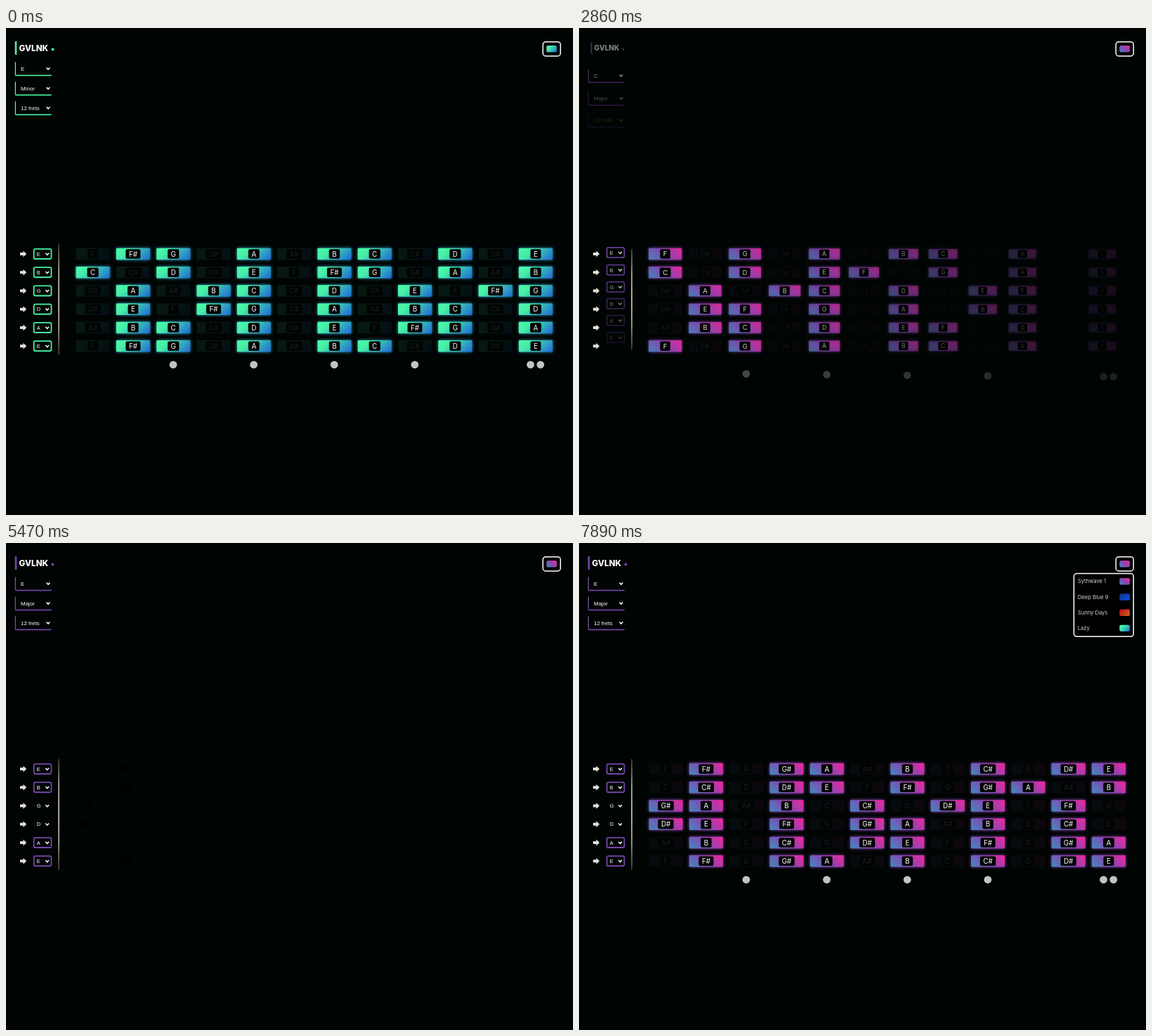
These frames come from a looping animation (807x694 px, 8000 ms). An HTML page with a canvas:

```html
<!DOCTYPE html>
<html lang="en">
<head>
<meta charset="utf-8">
<title>Fretboard</title>
<style>
html, body { margin: 0; width: 100%; height: 100%; overflow: hidden; background: #000403; }
canvas { display: block; width: 807px; height: 694px; }
</style>
</head>
<body>
<canvas id="stage" width="807" height="694"></canvas>
<script>
const ctx = document.getElementById('stage').getContext('2d');
const BG = '#000403';
const LOOP = 8000;
const NOTES = ['C', 'C#', 'D', 'D#', 'E', 'F', 'F#', 'G', 'G#', 'A', 'A#', 'B'];
const STRINGS = ['E', 'B', 'G', 'D', 'A', 'E'];
const MAJOR = [0, 2, 4, 5, 7, 9, 11];
const MINOR = [0, 2, 3, 5, 7, 8, 10];
const SANS = '"Liberation Sans", Arial, sans-serif';
const INTER = 'Inter, sans-serif';

// Gradients run down-right, or up-right when "up" is set.
const LAZY = { stops: ['#4bffa5', '#46eda8', '#1f68d6'], line: '#48f3a4', glow: '#2f9fc0', dim: 0.085 };
const SYNTH = { stops: ['#3d8cbe', '#8a45b2', '#f2279b'], up: true, line: '#7646a8', glow: '#8c43b4', dim: 0.06 };
const MENU = [
  ['Sythwave 1', SYNTH],
  ['Deep Blue 9', { stops: ['#0b2f78', '#0e3aa4', '#1450ea'] }],
  ['Sunny Days', { stops: ['#c00a28', '#c4261c', '#cf6a14'] }],
  ['Lazy', LAZY]
];

// Timeline, ms
const RELOAD = 2365, LOAD_START = 2270;
const OPEN = 4220, PICK = 5410, PICK_START = 5430;
const PALETTE = 7890;

const clamp = v => Math.max(0, Math.min(1, v));
const ease = p => p < 0.5 ? 2 * p * p : 1 - 2 * (1 - p) * (1 - p);
const reveal = (t, delay, len) => ease(clamp((t - delay) / len));
const rowY = i => 322 + 26.25 * i;
const colX = n => 123.6 + 57.3 * (n - 1);

function group(x, y, scale, alpha, draw) {
  ctx.save();
  ctx.translate(x, y);
  ctx.scale(scale, scale);
  ctx.globalAlpha = alpha;
  draw();
  ctx.restore();
}

function box(x, y, w, h, r) {
  ctx.beginPath();
  ctx.roundRect(x, y, w, h, r);
}

function text(s, x, y, font, color, align = 'left') {
  ctx.font = font;
  ctx.fillStyle = color;
  ctx.textAlign = align;
  ctx.textBaseline = 'alphabetic';
  ctx.fillText(s, x, y);
}

function paint(theme, w, h) {
  const d = (w + h) / 4, k = theme.up ? -d : d;
  const g = ctx.createLinearGradient(-d, -k, d, k);
  theme.stops.forEach((c, i) => g.addColorStop([0, theme.up ? 0.5 : 0.3, 1][i], c));
  return g;
}

function chevron(x, y) {
  ctx.beginPath();
  ctx.moveTo(x - 2.4, y - 1.2);
  ctx.lineTo(x, y + 1.3);
  ctx.lineTo(x + 2.4, y - 1.2);
  ctx.strokeStyle = '#fff';
  ctx.lineWidth = 1.5;
  ctx.stroke();
}

function logo(theme, e) {
  const s = 0.72 + 0.28 * e;
  group(40.5, 28.5, s, e, () => {
    ctx.fillStyle = theme.line;
    ctx.fillRect(-27.8, -9.5, 2.6, 19);
    text('GVLNK', -22, 4.2, '800 11.7px ' + INTER, '#fff');
    ctx.beginPath();
    ctx.arc(26, 2, 2, 0, 7);
    ctx.fillStyle = theme.line;
    ctx.fill();
  });
}

function headerSelect(label, y, theme, alpha) {
  group(0, y, 1, alpha, () => {
    const side = ctx.createLinearGradient(0, -10, 0, 10);
    side.addColorStop(0, theme === LAZY ? '#b9c8c2' : '#75688c');
    side.addColorStop(1, theme.line);
    box(12.5, -10, 53, 20.8, 3);
    ctx.save();
    ctx.clip();
    ctx.fillStyle = side;
    ctx.fillRect(12.5, -10, 1.5, 21);
    ctx.fillStyle = theme.line;
    ctx.fillRect(12.5, 8.9, 53, 2);
    ctx.restore();
    text(label, 21, 2.8, '8px ' + SANS, '#fff');
    chevron(60, 0);
  });
}

function stringSelect(label, y, theme, alpha, framed) {
  group(0, y, 1, alpha, () => {
    if (framed) {
      box(39.7, -7.2, 24.8, 14.2, 2);
      ctx.strokeStyle = theme.line;
      ctx.lineWidth = 1.8;
      ctx.stroke();
    }
    text(label, 43.7, 2.7, '7.5px ' + SANS, '#fff');
    chevron(58.7, 0);
  });
}

function arrow(y) {
  ctx.beginPath();
  [[20, -2], [24.5, -2], [24.5, -4.4], [29.2, 0], [24.5, 4.4], [24.5, 2], [20, 2]]
    .forEach(([x, dy]) => ctx.lineTo(x, y + dy));
  ctx.fillStyle = '#e4e0da';
  ctx.fill();
}

function nut(scale) {
  const h = 79 * scale;
  const g = ctx.createLinearGradient(0, 387 - h, 0, 387 + h);
  g.addColorStop(0, '#4a4642');
  g.addColorStop(0.25, '#d8d0c6');
  g.addColorStop(0.5, '#f4eee6');
  g.addColorStop(0.75, '#d0c8be');
  g.addColorStop(1, '#4a4642');
  ctx.fillStyle = g;
  ctx.fillRect(74.4, 387 - h, 1.4, 2 * h);
}

function note(name, n, y, theme, lit, e) {
  if (e <= 0) return;
  const off = 1 - e;
  group(colX(n) - 10 * off, y, 1 - 0.22 * off, e * (lit ? 1 : theme.dim), () => {
    ctx.fillStyle = paint(theme, 48, 16.6);
    if (lit) {
      ctx.shadowColor = theme.glow;
      ctx.shadowBlur = 4;
    }
    box(-24, -8.3, 48, 16.6, 1);
    ctx.fill();
    ctx.shadowBlur = 0;

    ctx.font = '9.8px ' + INTER;
    const w = ctx.measureText(name).width + 9;
    ctx.globalAlpha = 1;
    ctx.fillStyle = lit ? '#000201' : BG;
    box(-w / 2, -6.8, w, 13.6, 2);
    ctx.fill();
    ctx.globalAlpha = lit ? e : e * 0.1;
    text(name, 0, 3.5, '9.8px ' + INTER, '#fff', 'center');
  });
}

function board(theme, root, steps, t) {
  const scale = steps.map(s => (NOTES.indexOf(root) + s) % 12);
  STRINGS.forEach((open, i) => {
    for (let n = 1; n <= 12; n++) {
      const k = (NOTES.indexOf(open) + n) % 12;
      note(NOTES[k], n, rowY(i), theme, scale.includes(k), reveal(t, 40 * (n - 1), 750));
    }
  });
  for (const n of [3, 5, 7, 9, 12]) {
    const e = reveal(t, 20 * n, 1280);
    for (const dx of n === 12 ? [-7.2, 7] : [0]) {
      ctx.globalAlpha = e;
      ctx.beginPath();
      ctx.arc(colX(n) + dx - 0.2, 479.8 + 20 * (1 - e), 5.4, 0, 7);
      ctx.fillStyle = '#bfc7c3';
      ctx.fill();
    }
  }
  ctx.globalAlpha = 1;
}

function frame(x, y, w, h) {
  box(x, y, w, h, 4);
  ctx.fillStyle = '#000';
  ctx.fill();
  ctx.strokeStyle = '#fff';
  ctx.lineWidth = 1.5;
  ctx.stroke();
}

function swatch(y, theme) {
  group(776.6, y, 1, 1, () => {
    ctx.fillStyle = paint(theme, 14.6, 9.4);
    box(-7.3, -4.7, 14.6, 9.4, 2);
    ctx.fill();
  });
}

function themeMenu() {
  frame(704.4, 43.5, 84.8, 89.8);
  MENU.forEach(([name, theme], i) => {
    const y = 54.8 + 22.2 * i;
    text(name, 709.8, y + 2.6, '7.6px ' + INTER, '#cdd2d0');
    swatch(y, theme);
  });
}

function keyList(t) {
  const picked = [4550, 4650, 4790, 4960].filter(at => t >= at).length;
  ctx.fillStyle = '#fff';
  ctx.fillRect(12.5, 68, 52.5, 121);
  NOTES.forEach((name, i) => {
    const y = 73.6 + 9.93 * i;
    if (i === picked) {
      ctx.fillStyle = '#7a54c8';
      ctx.fillRect(12.5, y - 5.2, 52.5, 10.4);
    }
    text(name, 20.5, y + 2.6, '7.4px ' + SANS, i === picked ? '#fff' : '#222');
  });
  ctx.strokeStyle = '#77747c';
  ctx.lineWidth = 0.6;
  ctx.strokeRect(12.5, 68, 52.5, 121);
}

function draw(t) {
  ctx.globalAlpha = 1;
  ctx.fillStyle = BG;
  ctx.fillRect(0, 0, 807, 694);

  const loaded = t >= RELOAD, chosen = t >= PICK;
  const theme = loaded ? SYNTH : LAZY;
  const root = loaded && !chosen ? 'C' : 'E';
  const page = loaded ? t - LOAD_START : 1e5;
  const notes = chosen ? t - PICK_START : page;

  logo(theme, reveal(page, 215, 750));
  [root, loaded ? 'Major' : 'Minor', '12 frets'].forEach((label, i) => {
    const e = reveal(page, 215 + 95 * i, 750);
    headerSelect(label, 57.8 + 28 * i + 20 * (1 - e), theme, e);
  });

  STRINGS.forEach((label, i) => {
    const e = reveal(page, 30 + 65 * i, 750);
    const framed = !(chosen && (i === 2 || i === 3));
    stringSelect(label, rowY(i) - 15 * (1 - e), theme, e, framed);
    arrow(rowY(i));
  });
  nut(reveal(page, 0, 750));
  board(theme, root, loaded ? MAJOR : MINOR, notes);

  frame(764.2, 19.7, 25, 20.2);
  swatch(29.8, theme);
  if (t >= OPEN && !chosen) keyList(t);
  if (t >= PALETTE) themeMenu();
}

const start = performance.now();
function tick() {
  draw((performance.now() - start) % LOOP);
  requestAnimationFrame(tick);
}
tick();
</script>
</body>
</html>
```
